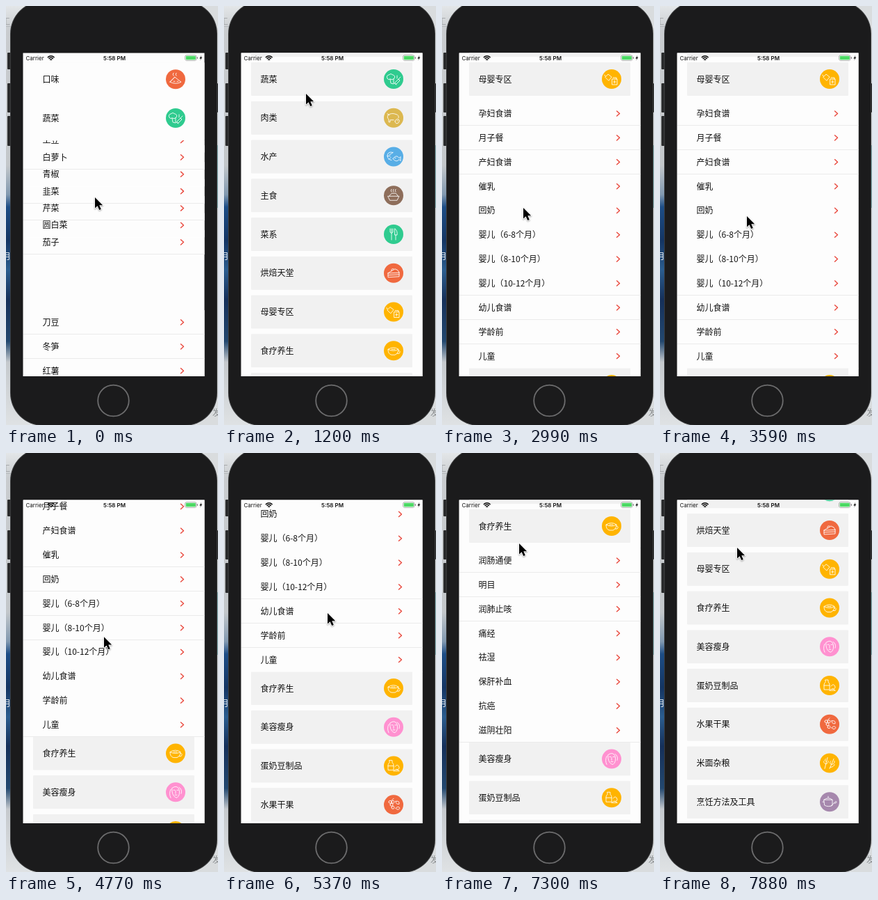
These frames come from a looping animation (305 px wide and 602 px high, 8000 ms). An HTML page with a canvas:

```html
<!DOCTYPE html>
<html lang="zh">
<head>
<meta charset="utf-8">
<style>
html, body { margin: 0; height: 100%; overflow: hidden; background: #d3d6d9; }
canvas { display: block; }
</style>
</head>
<body>
<canvas id="stage" width="305" height="602"></canvas>
<script>
const ctx = document.getElementById('stage').getContext('2d');
const LOOP = 8000, TICK = 148.7;
const CARD = 55.75, ROW = 34.85;
const PAPER = '#fdfdfd', ORANGE = '#f0693f', GREEN = '#2fcb8f', AMBER = '#ffb400';
const CJK = '12px "Noto Sans CJK SC", "Noto Sans CJK", sans-serif';

// title, icon colour, icon outline around (0,0), rows
const sections = [
  ['口味', ORANGE, 'M-8 4Q0 8 8 4L-1-3ZM-8 4L-1-3M-3-5q-2-2 0-4M1-5q-2-2 0-4M-3 3h2M2 3h2'],
  ['蔬菜', GREEN, 'M-9-1q-2-4 2-5q3-3 6 0q4 1 2 5q-3 3-6 1q-3 2-4-1M-5 0l1 6l4 1l0-7M2 5l5-5l2 2l-5 5ZM5-1l0-4M7 0l3-3M1 6l3 2',
    '土豆 白萝卜 青椒 韭菜 芹菜 圆白菜 茄子 刀豆 冬笋 红薯 山药 莲藕'],
  ['肉类', '#dcb850', 'M-8-4q5-4 12-1q4 1 3 5M-8-4q-2 4 1 6l0 4h2v-3h5M-9-6l3 2M2 5q1-4 5-3q3 2 0 5q-4 3-5-2M5 4h1'],
  ['水产', '#58aee6', 'M-1-6q-7-2-8 4q0 6 6 7M-1-6q-3 3-5 3M-9-1h4M-7 4l3-3M-1 3q5-7 9-1l2-2v6l-2-2q-4 5-9-1M2 2h1'],
  ['主食', '#8e6e5b', 'M-8 1H8L5 7H-5ZM-6 1q2-5 6-4q5-1 6 4M-3-5q-2-2 0-4M0-5q-2-2 0-4M3-5q-2-2 0-4'],
  ['菜系', GREEN, 'M-5-8v5q2 3 4 0v-5M-3-8V8M2-8q4 3 3 9H2ZM3 1v7'],
  ['烘焙天堂', ORANGE, 'M-8 0L2-6q5 1 6 5ZM-8 0V6L8 5V-1M-8 3L8 2M-3-3q-1-4 3-3'],
  ['母婴专区', AMBER, 'M-9-3l4-4l5 4l-4 5ZM-9-4l-1-2M1 0h7v8h-7ZM2-2h5v2M3 4h3M4 2v4',
    '孕妇食谱 月子餐 产妇食谱 催乳 回奶 婴儿（6-8个月） 婴儿（8-10个月） 婴儿（10-12个月） 幼儿食谱 学龄前 儿童'],
  ['食疗养生', AMBER, 'M-8-2q8-5 15 0q-7 4-15 0q0 7 5 8h5q5-2 5-8M7 0q4 0 1 4h-3M-3-2h5',
    '润肠通便 明目 润肺止咳 痛经 祛湿 保肝补血 抗癌 滋阴壮阳'],
  ['美容瘦身', '#ff91d0', 'M-5-6q7-5 10 2q2 8-3 12q-6-1-7-9ZM-3-3h2M2-3h2M0-2v4M-1 4h3M-7-4q-3 6 0 12M5-7q5 3 3 9'],
  ['蛋奶豆制品', AMBER, 'M-6-8h4v3q2 2 2 4v7h-8v-7q0-2 2-4ZM-8 0h8M2 1q4-5 6 1q0 4-4 3M0 7q4-4 8 0Z'],
  ['水果干果', ORANGE, 'M-7-4a2 2 0 1 1 4 0a2 2 0 1 1-4 0M-3-4a2 2 0 1 1 4 0a2 2 0 1 1-4 0M-5 0a2 2 0 1 1 4 0a2 2 0 1 1-4 0M-3 4a2 2 0 1 1 4 0a2 2 0 1 1-4 0M-3-6l3-3M3-5q6-1 5 4q-5 1-5-4M3 5q4-4 6 0q-3 4-6 0'],
  ['米面杂粮', AMBER, 'M-7 8L-3-8M-6 1q-4-2-2-4M-5-2q-3-2-1-4M-5 1q4-1 3-4M0 8L6-6M2 2q-3-3 0-5M3 2q5-1 4-5M1 6q5 0 6-4'],
  ['烹饪方法及工具', '#a688ad', 'M-8-3H4V5q-6 3-11 0ZM-8-3q6-5 12 0M-2-6v-2M-10 0h2M2 6l5-5q2-3 3-1q0 2-3 2']
].map(([title, color, icon, rows = '']) =>
  ({ title, color, icon: new Path2D(icon), rows: rows.split(' ').filter(Boolean) }));

// keys: [tick, value...]; linear in between
function track(n, keys) {
  let i = keys.findIndex(k => k[0] > n);
  if (i < 0) return keys[keys.length - 1].slice(1);
  if (i === 0) return keys[0].slice(1);
  const a = keys[i - 1], b = keys[i], f = (n - a[0]) / (b[0] - a[0]);
  return a.slice(1).map((v, j) => v + (b[j + 1] - v) * f);
}

// each scene: pinned section, header position, how far it is open, tick at which it begins to close
const scenes = [
  { from: 0, index: 1, closeAt: 6, squash: true,
    y: [[0, 161], [1, 140], [2, 120], [3, 109], [4, 105], [12, 105], [13, 70], [14, 18], [15, -8], [16, -24], [17, -32]],
    open: [[0, .7], [1, .85], [2, .95], [3, 1], [5, 1], [6, .6], [7, .2], [8, 0]] },
  { from: 17, index: 7, closeAt: 99,
    y: [[17, 302.5], [18, 225], [19, 140], [20, 105], [24, 105], [28, 60], [29, 60], [33, -30], [36, -101]],
    open: [[17, 0], [18, .4], [19, .8], [20, 1]] },
  { from: 40, index: 8, closeAt: 50, leaving: 7,
    y: [[40, 290], [41, 215], [42, 161], [43, 118], [44, 105], [49, 105], [50, 130], [51, 180], [52, 212], [53, 222.5]],
    open: [[40, .4], [41, .7], [42, .86], [43, .95], [44, 1], [49, 1], [50, .6], [51, .25], [52, .07], [53, 0]] }
];
const pointer = [[0, 128, 275], [4, 118, 126], [8, 118, 126], [12, 117, 270], [14, 117, 277], [17, 117, 290],
  [21, 117, 290], [24, 125, 302], [28, 135, 290], [29, 135, 290], [36, 149, 230], [39, 144, 325],
  [42, 144, 315], [44, 144, 315], [49, 111, 130], [53, 111, 136]];

function rect(color, x, y, w, h, r = 0) {
  ctx.fillStyle = color;
  ctx.beginPath();
  ctx.roundRect(x, y, w, h, r);
  ctx.fill();
}
function text(str, x, y, font = CJK, color = '#111', align = 'left') {
  ctx.font = font;
  ctx.fillStyle = color;
  ctx.textAlign = align;
  ctx.textBaseline = 'alphabetic';
  ctx.fillText(str, x, y);
}
function stroke(path, color, width) {
  ctx.strokeStyle = color;
  ctx.lineWidth = width;
  ctx.lineJoin = ctx.lineCap = 'round';
  ctx.stroke(path);
}
function at(x, y, draw) {
  ctx.save();
  ctx.translate(x, y);
  draw();
  ctx.restore();
}

const chevron = new Path2D('M-2-3.6L2 0L-2 3.6');
const arrow = new Path2D('M0 0V15.5L3.6 12.2L6.2 18L8.8 16.9L6.3 11.2H11.2Z');
const bolt = new Path2D('M1-4L-2 1H0L-1 4L2-1H0Z');

function drawCard(s, y, plain) {
  if (y < 30 || y > 565) return;
  rect(PAPER, 25, y - 24, 261, CARD);
  if (!plain) rect('#f1f1f1', 39, y - 24, 232, 48, 1);
  text(s.title, 52.5, y + 4.5);
  at(244, y, () => {
    rect(s.color, -14, -14, 28, 28, 14);
    stroke(s.icon, '#fff', .85);
  });
}
function drawRow(label, y) {
  if (y < 40 || y > 555) return;
  const bottom = y + ROW / 2;
  rect(PAPER, 25, y - ROW / 2, 261, ROW);
  if (bottom % 1 >= .5) rect('#ebebeb', 25, Math.floor(bottom), 261, 1);
  text(label, 52.5, y + 4.5);
  at(253.5, y, () => stroke(chevron, '#e9483d', 1.4));
}
// Earlier rows lie on top of later ones
function drawRows(rows, place, first = 0) {
  for (let k = rows.length - 1; k >= first; k--) drawRow(rows[k], place(k));
}

function drawList(n) {
  const scene = scenes.filter(s => n >= s.from).pop();
  const { index } = scene, s = sections[index];
  const [y] = track(n, scene.y), [open] = track(n, scene.open);
  const closing = n >= scene.closeAt, opening = !closing && open > 0 && open < 1;
  const plain = n === 0;

  if (scene.leaving && opening) {
    drawRows(sections[scene.leaving].rows, k => 53 + 50 * open + (k - 3) * ROW * (1 - open), 3);
    rect('#ebebeb', 25, y + 33, 261, 1);
  } else {
    for (let i = 0; i < index; i++) drawCard(sections[i], y - (index - i) * CARD, plain);
  }
  if (!opening) {
    const next = y + CARD + s.rows.length * ROW * open;
    for (let i = index + 1; i < sections.length; i++) drawCard(sections[i], next + (i - index - 1) * CARD, plain);
  }
  if (open > 0) {
    ctx.save();
    ctx.beginPath();
    ctx.rect(25, y + 32, 261, 2000);
    ctx.clip();
    drawRows(s.rows, k => {
      const rest = 49.5 + k * ROW;
      if (closing || (scene.squash && k < 7)) return y - 9 + (rest + 9) * open;
      return y + rest - (scene.squash ? 0 : 25 * (1 - open));
    });
    ctx.restore();
  }
  drawCard(s, y, plain);
}

function drawStatus() {
  text('Carrier', 28.5, 78, '8px Inter, sans-serif', '#111');
  text('5:58 PM', 156, 78, '600 8px Inter, sans-serif', '#111', 'center');
  at(64.7, 78, () => {
    for (const r of [1.2, 3.7, 6.2]) {
      const arc = new Path2D();
      arc.arc(0, 0, r, -Math.PI * .75, -Math.PI * .25);
      stroke(arc, '#111', 1.5);
    }
  });
  rect('#777', 257.5, 70.5, 16.5, 8, 2);
  rect('#fff', 258, 71, 15.5, 7, 1.6);
  rect('#4cd964', 258.7, 71.7, 14.1, 5.6, 1);
  rect('#777', 274.6, 73, 1.2, 3, .6);
  at(280.3, 74.5, () => { ctx.fillStyle = '#111'; ctx.fill(bolt); });
}

function drawDesk() {
  const g = ctx.createLinearGradient(0, 0, 0, 602);
  [[0, '#e3e6e8'], [.06, '#c9cccf'], [.38, '#c3c7ca'], [.45, '#8299b0'], [.48, '#1d4d86'], [.56, '#143563'],
    [.63, '#2b5d8f'], [.7, '#15305a'], [.8, '#23486f'], [.85, '#c5c9cd'], [1, '#dfe2e4']]
    .forEach(([p, c]) => g.addColorStop(p, c));
  ctx.fillStyle = g;
  ctx.fillRect(0, 0, 152, 602);
  rect('#d9dcde', 152, 0, 153, 602);
  rect('#8fb9bd', 303, 200, 2, 90);
  rect('#b5b9bc', 0, 29, 8, 1);
  text('工', -6, 27, CJK, '#a3a6a9');
  text('月', -5, 364, CJK, '#eef1f4');
  text('发', 297, 589, CJK, '#8b8e91');
  for (const [y, h] of [[67, 24], [111, 42], [158, 43]]) rect('#2b2c2d', 2, y, 8, h, 1);
  rect('#2b2c2d', 300, 111, 5, 42, 1);
  rect('#3a3b3c', 6, -7, 298, 610, 47);
  rect('#1b1b1c', 7, -6, 296, 608, 46);
  const home = new Path2D();
  home.arc(154.5, 567, 22.3, 0, 7);
  stroke(home, '#6c6c6d', 1.8);
}

function frame(now) {
  const n = Math.min(53, Math.floor((now % LOOP + 2) / TICK));
  drawDesk();
  ctx.save();
  ctx.beginPath();
  ctx.rect(24.5, 67.5, 261, 464.5);
  ctx.clip();
  rect(PAPER, 24, 67, 263, 466);
  drawList(n);
  drawStatus();
  ctx.restore();
  at(...track(n, pointer), () => {
    ctx.shadowColor = 'rgba(0,0,0,.35)';
    ctx.shadowBlur = 2;
    ctx.shadowOffsetY = 1;
    stroke(arrow, '#fff', 1.8);
    ctx.shadowColor = 'transparent';
    ctx.fillStyle = '#000';
    ctx.fill(arrow);
  });
}

const start = performance.now();
(function loop() {
  frame(performance.now() - start);
  requestAnimationFrame(loop);
})();
</script>
</body>
</html>
```
